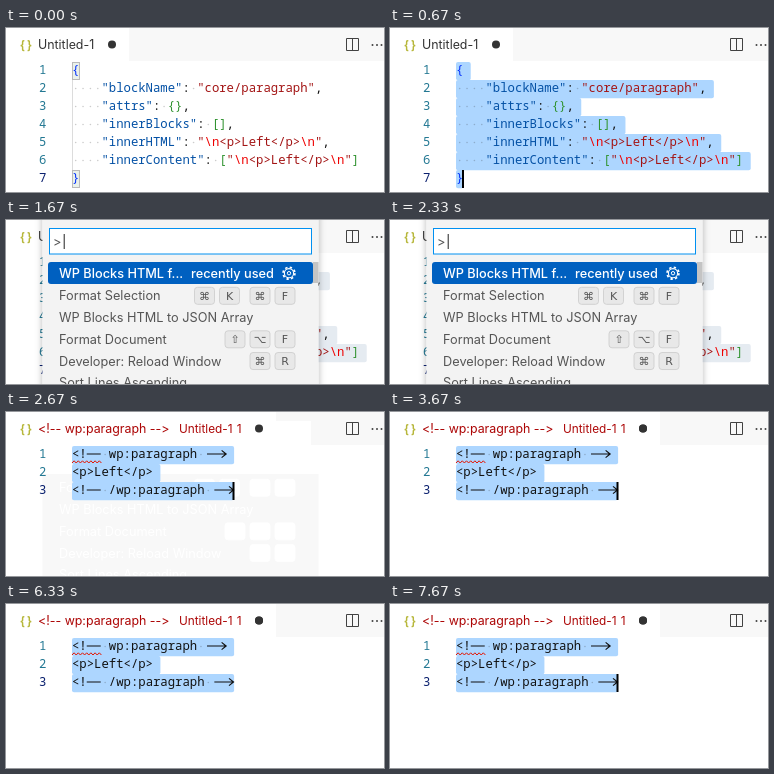
Write an HTML page that moves like this. It is 378x164 px and loops after 8000 ms.

```html
<!DOCTYPE html>
<html lang="en">
<head>
<meta charset="utf-8">
<title>Editor command palette</title>
<style>
  html, body { margin: 0; width: 100%; height: 100%; overflow: hidden; background: #fff; }
  svg { display: block; width: 100vw; height: 100vh; }
  text { white-space: pre; font: 12.75px Inter, Roboto, sans-serif; font-variant-ligatures: none; font-feature-settings: "calt" 0; }
  .tab { font-size: 12.4px; }
  .icon { font: bold 11.5px "Noto Sans Mono", monospace; }
  .note { font-size: 11.8px; word-spacing: 1px; }
  .code { font: 500 12.28px "Noto Sans Mono", "DejaVu Sans Mono", monospace; }
  .key { font: 11px "DejaVu Sans", sans-serif; text-anchor: middle; }
  .pick { font-weight: 500; }
</style>
</head>
<body>
<svg id="stage" viewBox="0 0 378 164"></svg>
<script>
const LOOP = 8000;
const LEFT = 66, CHAR = 7.368, ROW = 18, TOP = 34;
const ink = { k: '#0451a5', s: '#a31515', e: '#ee0000', b: '#319331', o: '#0431fa', p: '#111', hidden: 'none' };

const esc = s => s.replace(/&/g, '&amp;').replace(/</g, '&lt;').replace(/>/g, '&gt;');
const rect = (x, y, w, h, fill, more = '') =>
  `<rect x="${x}" y="${y}" width="${w}" height="${h}" fill="${fill}" ${more}/>`;
const label = (x, y, s, fill, more = '') =>
  `<text x="${x}" y="${y}" fill="${fill}" ${more}>${esc(s)}</text>`;
const path = (d, stroke, w = 1) =>
  `<path d="${d}" fill="none" stroke="${stroke}" stroke-width="${w}"/>`;
const group = (id, body) => `<g id="${id}">${body}</g>`;

// Each line is a list of [colour, text] tokens
const prop = (name, ...value) => [['p', '    '], ['k', `"${name}"`], ['p', ': '], ...value];
const html = [['s', '"'], ['e', '\\n'], ['s', '<p>Left</p>'], ['e', '\\n'], ['s', '"']];
const json = [
  [['o', '{']],
  prop('blockName', ['s', '"core/paragraph"'], ['p', ',']),
  prop('attrs', ['b', '{}'], ['p', ',']),
  prop('innerBlocks', ['b', '[]'], ['p', ',']),
  prop('innerHTML', ...html, ['p', ',']),
  prop('innerContent', ['b', '['], ...html, ['b', ']']),
  [['o', '}']]
];
// The dashes and the arrow are drawn as strokes, like the font's ligatures
const comment = s => [['p', '<!'], ['hidden', '--'], ['p', ` ${s} `], ['hidden', '-->']];
const markup = [comment('wp:paragraph'), [['p', '<p>Left</p>']], comment('/wp:paragraph')];
const plain = line => line.map(t => t[1]).join('');

function code(lines) {
  return lines.map((line, i) => {
    const y = TOP + 12 + i * ROW;
    const dots = [...plain(line)].map((c, n) => c === ' '
      ? `<circle cx="${LEFT + (n + .5) * CHAR}" cy="${y - 3.5}" r=".8" fill="#333" opacity=".25"/>` : '').join('');
    const spans = line.map(([c, s]) => `<tspan fill="${ink[c]}">${esc(s)}</tspan>`).join('');
    const num = label(33, y, String(i + 1), i === lines.length - 1 ? '#0b216f' : '#237893', 'class="code"');
    return `${num}${dots}<text class="code" x="${LEFT}" y="${y}">${spans}</text>`;
  }).join('');
}

function selection(lines, fill) {
  return lines.map((line, i) => {
    const n = plain(line).length + (i < lines.length - 1 ? 1 : 0);
    return rect(LEFT, TOP + i * ROW, n * CHAR, ROW + .2, fill, 'rx="2"');
  }).join('');
}

function ligatures(lines) {
  return lines.map((line, i) => {
    const s = plain(line), y = TOP + 8 + i * ROW;
    if (!s.startsWith('<!')) return '';
    const tip = LEFT + s.length * CHAR - .6;
    return path(`M${LEFT + 2 * CHAR} ${y}h${1.9 * CHAR}M${tip - 2.6 * CHAR} ${y}H${tip}` +
      `M${tip - 4.5} ${y - 3.6}L${tip} ${y}L${tip - 4.5} ${y + 3.6}`, ink.p, 1.2);
  }).join('');
}

const caret = (id, x, row) => group(id, rect(x, TOP + row * ROW, 2, ROW, '#000'));

function tab(width, body, dot) {
  return rect(0, 0, width, 33, '#fff') +
    label(13, 20.5, '{', '#b7b73b', 'class="icon"') + label(20, 20.5, '}', '#b7b73b', 'class="icon"') +
    body + `<circle cx="${dot}" cy="16.5" r="4" fill="#333"/>`;
}

const bar = rect(0, 0, 378, 164, '#fff') + rect(0, 0, 378, 33, '#f8f8f8') +
  path('M340.5 10.5h12v12h-12zM346.5 10.5v12', '#424242') +
  [366.5, 371, 375.5].map(x => `<circle cx="${x}" cy="17" r="1" fill="#424242"/>`).join('');

// Palette rows; each shortcut is a list of chords
const commands = [
  ['Format Selection', '⌘K', '⌘F'],
  ['WP Blocks HTML to JSON Array'],
  ['Format Document', '⇧⌥F'],
  ['Developer: Reload Window', '⌘R'],
  ['Sort Lines Ascending']
];
function rows(color, keyFill, keyStroke) {
  return commands.map(([name, ...chords], i) => {
    const y = 75.8 + i * 21.75;
    let x = 279, caps = '';
    for (const chord of chords.reverse()) {
      for (const k of [...chord].reverse()) {
        caps += rect(x - 10, y - 8.5, 20, 17, keyFill, `rx="3" stroke="${keyStroke}" stroke-width=".8"`) +
          label(x, y + 4, k, color, 'class="key"');
        x -= 25;
      }
      x -= 5.5;
    }
    chords.reverse();
    return label(53, y + 4.5, name, color) + caps;
  }).join('');
}

const gear = `<circle cx="283" cy="53.2" r="4.6" fill="none" stroke="#fff" stroke-width="1.1"/>
  <circle cx="283" cy="53.2" r="5.9" fill="none" stroke="#fff" stroke-width="1.8" stroke-dasharray="2.32 2.32"/>
  <circle cx="283" cy="53.2" r="1.7" fill="none" stroke="#fff"/>`;

const palette =
  rect(36.5, -8, 276, 180, '#f3f3f3', 'filter="url(#shadow)"') +
  rect(43.5, 8.5, 262, 25.5, '#fff', 'stroke="#0090f1"') +
  label(47, 26.3, '>', '#555') +
  group('inputCaret', rect(57.7, 14, 1, 15, '#222')) +
  rect(42, 42, 265, 22, '#0060c0', 'rx="3"') +
  rect(307, 42, 5.5, 21, '#c4c4c4') +
  label(53, 57.8, 'WP Blocks HTML f...', '#fff', 'class="pick"') +
  label(268, 57.8, 'recently used', '#fff', 'class="pick" text-anchor="end"') +
  gear + rows('#555', '#e8e8e8', '#cbcbcb');

const residue = rect(43, 9, 262, 24, '#fff') +
  rect(36.5, 62, 276, 102, '#f8f8f8') + rows('#fff', '#fff', '#fff');

const braces = [0, 6].map(i =>
  rect(LEFT + .5, TOP + i * ROW + .5, CHAR - .4, ROW - 1, '#eaf1ea', 'stroke="#b9b9b9"')).join('');

let wave = `M${LEFT} 51`;
for (let i = 1; i <= 14; i++) wave += `L${LEFT + i * 2.1} ${i % 2 ? 48.8 : 51}`;

document.getElementById('stage').innerHTML = `
  <defs><filter id="shadow" x="-10%" y="-10%" width="120%" height="120%">
    <feDropShadow dx="0" dy="0" stdDeviation="3.5" flood-opacity=".3"/></filter></defs>` +
  bar +
  group('before',
    tab(123, label(32, 21, 'Untitled-1', '#333', 'class="tab"'), 106) +
    group('matched', path('M66.5 52V142', '#dcdcdc') + braces) +
    group('selected', selection(json, '#add6ff')) +
    group('unfocused', selection(json, '#e5ebf1')) +
    code(json) + caret('jsonCaret', 72, 6)) +
  group('palette', palette) +
  group('after',
    tab(270, '', 253) +
    group('residue', residue) +
    label(32, 21, '<!-- wp:paragraph -->', '#ad0707', 'class="tab"') +
    label(173, 21, 'Untitled-1 1', '#ad0707', 'class="note"') +
    `<circle cx="253" cy="16.5" r="4" fill="#333"/>` +
    selection(markup, '#add6ff') + code(markup) + ligatures(markup) +
    path(wave, '#e51400') + caret('htmlCaret', 226.5, 2));

const within = (t, ...spans) => spans.some(([a, b]) => t >= a && t < b);
const show = (id, on) => { document.getElementById(id).style.display = on ? '' : 'none'; };

function draw(t) {
  show('before', t < 2670);
  show('matched', t < 670);
  show('selected', within(t, [670, 1670]));
  show('unfocused', within(t, [1670, 2670]));
  show('jsonCaret', within(t, [670, 1330]));
  show('palette', within(t, [1670, 2670]));
  show('inputCaret', !within(t, [2000, 2330]));
  show('after', t >= 2670);
  show('residue', within(t, [2670, 3000]));
  show('htmlCaret', within(t, [2670, 3000], [3670, 4330], [4670, 5000],
    [5670, 6000], [6670, 7000], [7330, LOOP]));
}

const start = performance.now();
function tick() {
  draw((performance.now() - start) % LOOP);
  requestAnimationFrame(tick);
}
tick();
</script>
</body>
</html>
```
